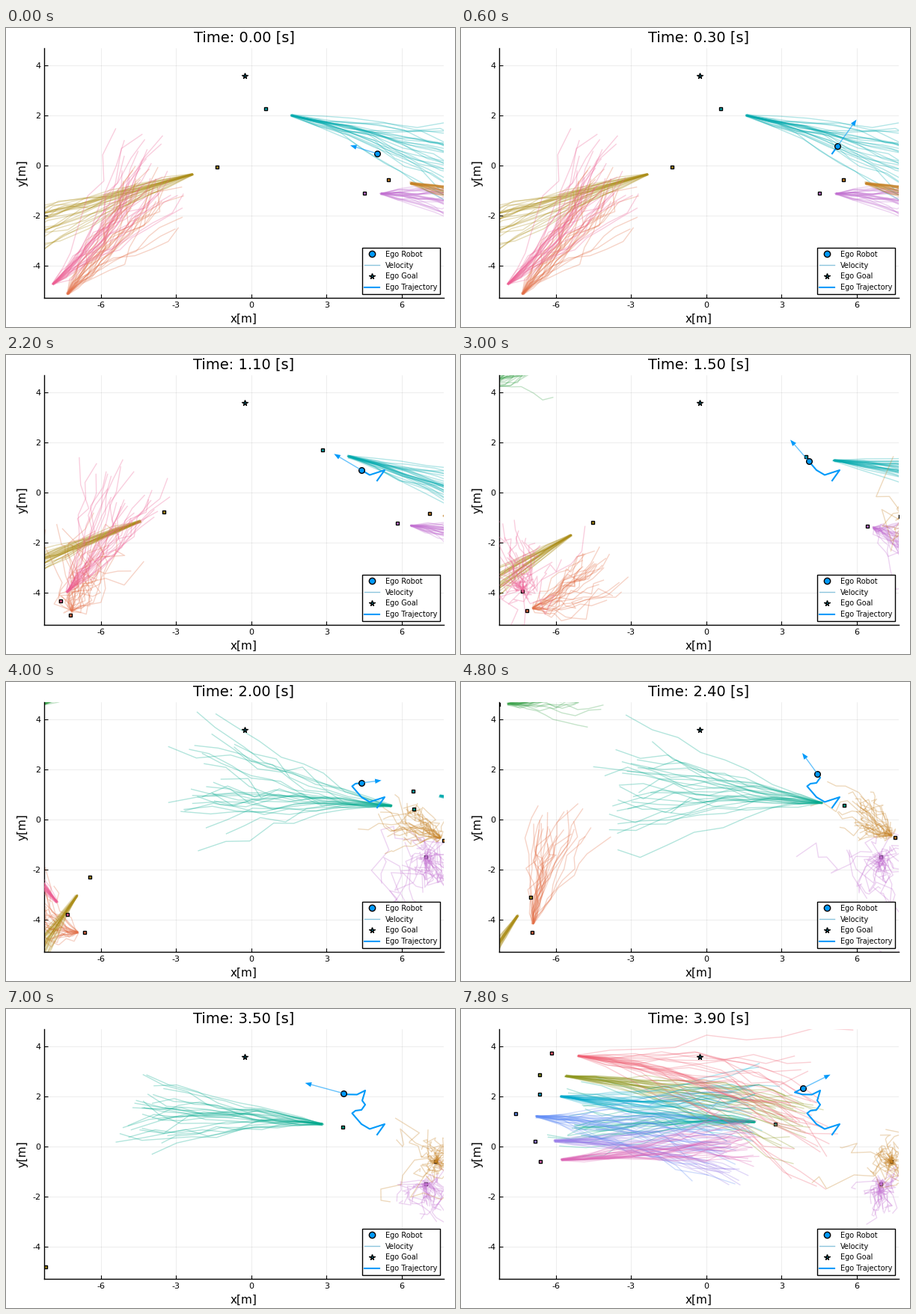
These frames come from a looping animation (600x400 px, 8 s). A matplotlib script:

```python
import numpy as np
import matplotlib.pyplot as plt
from matplotlib.animation import FuncAnimation
from matplotlib.collections import LineCollection
from matplotlib.lines import Line2D
from matplotlib.patches import Polygon

plt.rcParams["font.family"] = "DejaVu Sans"
plt.rcParams["axes.unicode_minus"] = False

W, H, SCALE = 600, 400, 33.5           # stage size, pixels per metre
LEFT, RIGHT, TOP, BOTTOM = 51.2, 584.8, 27, 361
FRAMES, HOLD = 40, 4                   # pedestrians refresh every HOLD frames
HORIZON, SAMPLES = 8, 28
BLUE = "#009AFA"

rng = np.random.default_rng(12)
scenes = [[] for _ in range(FRAMES // HOLD)]


def metres(x, y):
    """Stage pixels to plot coordinates."""
    return (np.asarray(x) - 327.8) / SCALE, (184 - np.asarray(y)) / SCALE


def along(keys, t):
    """Position at time t on a path of (time, x, y) key points."""
    time, x, y = np.transpose(keys)
    return np.column_stack([np.interp(t, time, x), np.interp(t, time, y)])


def fan(pos, step, lean, spread):
    """Sampled futures: slow walkers scatter, fast ones spread from a beam."""
    speed = np.hypot(*step)
    slow = np.exp(-speed / 0.25)
    rough = 0.12 + 0.7 * slow
    unit = step / max(speed, 1e-6)
    s = np.linspace(0, 1, HORIZON + 1)[:, None]
    mean = pos + 0.9 * step + s * HORIZON * step + s ** 2 * np.array(lean)
    futures = []
    for _ in range(SAMPLES):
        drift = rng.normal(size=(HORIZON, 2)).cumsum(0).cumsum(0) / 14.3
        walk = rng.normal(size=(HORIZON, 2)).cumsum(0) / HORIZON ** 0.5
        off = np.vstack([[0, 0], (1 - rough) * drift + rough * walk])
        off += rng.normal(size=off.shape) * 0.14 * s
        off -= 0.5 * (1 - slow) * np.outer(off @ unit, unit)
        off *= np.exp(0.6 * slow * rng.normal())
        futures.append(mean + spread * off + rng.normal(size=2) * 0.022)
    return futures


def walker(color, keys, lean=(0, 0), spread=(0.9, 0.9)):
    """Add a pedestrian from its first key step up to the one before its last."""
    first, last = keys[0][0], keys[-1][0]
    for k in range(first, last):
        pos, ahead = along(keys, [k, k + 1])
        width = np.interp(k, [first, last], spread)
        scenes[k].append((color, pos, fan(pos, ahead - pos, lean, width)))


walker("#E36F47", [(0, -7.6, -5.5), (1, -7.3, -5.1), (3, -7.15, -4.72), (5, -6.65, -4.52),
                   (6, -6.95, -4.5), (7, -6.9, -4.13), (8, -6.75, -3.6)], (.5, .9), (1.3, .9))
walker("#3EA44E", [(3, -9.6, 4.2), (5, -8.9, 4.35), (6, -8.3, 4.6), (7, -7.87, 4.62),
                   (8, -7.1, 4.75)], (0, .7), (.7, .7))
walker("#C371D2", [(0, 4.52, -1.1), (1, 5.24, -1.13), (3, 6.42, -1.33), (5, 6.95, -1.5),
                   (10, 6.98, -1.5)], (0, -.7), (1.3, .4))
walker("#AC8E18", [(0, -1.37, -.06), (1, -2.45, -.38), (3, -4.53, -1.18), (5, -6.43, -2.3),
                   (7, -7.57, -3.92), (9, -8.85, -5.72)], (0, -.4), (1.1, .8))
walker("#00AAAE", [(0, .57, 2.26), (3, 3.97, 1.42), (5, 6.45, 1.12), (6, 7.65, .93)],
       (0, -.6), (1.3, .7))
walker("#ED5E93", [(0, -8.4, -5.1), (1, -7.87, -4.7), (3, -7.33, -3.95), (5, -7.33, -3.78),
                   (6, -7.8, -3.25)], (0, 1), (1.2, .8))
walker("#C68225", [(0, 5.47, -.57), (1, 6.45, -.72), (3, 7.75, -.95), (4, 7.85, -.95),
                   (7, 7.36, -.62), (10, 7.37, -.57)], spread=(1.4, .55))
walker("#00A98D", [(4, 7.45, .3), (7, 4.53, .68), (9, 2.75, .9), (10, 1.85, .99)],
       (0, -.4), (1.6, .8))

# a group entering from the left: colour, position, step, sideways lean, spread
for color, x, y, dx, dy, lean, spread in [
    ("#8E971E", -6.65, 2.87, 1.15, -.07, -.9, 1.1),
    ("#00A9CC", -6.65, 2.1, .94, -.1, .2, 1.0),
    ("#9B7FE9", -6.83, .22, .86, 0, -.9, .8),
    ("#618DF6", -7.6, 1.3, .9, -.1, 0, 1.4),
    ("#F06073", -6.17, 3.73, 1.17, -.12, -1.7, 1.6),
    ("#DD65B6", -6.62, -.6, .94, .08, -.1, .8),
]:
    walker(color, [(9, x, y), (10, x + dx, y + dy)], (0, lean), (spread, spread))

turns = [(0, 496, 168), (4, 506, 154), (8, 486, 160.5), (11, 475, 154), (16, 462.5, 139.5),
         (17, 467, 136), (20, 475, 135), (22, 480, 128), (24, 476, 122.5), (27, 478.7, 113.7),
         (28, 480, 109), (31, 469, 114.5), (34, 456.3, 114.3), (36, 446, 111.5), (39, 457, 106)]
robot = np.column_stack(metres(*along(turns, np.arange(FRAMES)).T))
velocity = np.vstack([[-36 / SCALE, 11 / SCALE], np.diff(robot, axis=0) * 10])

fig = plt.figure(figsize=(W / 100, H / 100), dpi=100, facecolor="white")
ax = fig.add_axes([LEFT / W, 1 - BOTTOM / H, (RIGHT - LEFT) / W, (BOTTOM - TOP) / H])
xlim, ylim = metres([LEFT, RIGHT], [BOTTOM, TOP])
ax.set(xlim=xlim, ylim=ylim, xticks=range(-6, 7, 3), yticks=range(-4, 5, 2))
ax.tick_params(direction="in", labelsize=8)
ax.grid(color="black", alpha=0.1, linewidth=0.5)
ax.set_axisbelow(True)
ax.spines[["top", "right"]].set_visible(False)
ax.spines[["left", "bottom"]].set_linewidth(1)
ax.set_xlabel("x[m]", size=11)
ax.set_ylabel("y[m]", size=11)
title = ax.set_title("", size=14)

edge = dict(markeredgecolor="black", markeredgewidth=1, linestyle="none")
goal = dict(marker="*", ms=5.3, markerfacecolor="#00A0C0", **edge)
layers = []
for n in range(max(map(len, scenes))):
    mark, = ax.plot([], [], "s", ms=3.1, zorder=2 + n / 10, **edge)
    lines = LineCollection([], linewidths=1, alpha=0.3, zorder=2.05 + n / 10)
    ax.add_collection(lines, autolim=False)
    layers.append((mark, lines))
ax.plot(*metres([319], [64]), zorder=4, **goal)
trail, = ax.plot([], [], color=BLUE, linewidth=1.5, zorder=5)
body, = ax.plot([], [], "o", ms=5.5, color=BLUE, zorder=6, **edge)
shaft, = ax.plot([], [], color=BLUE, alpha=0.6, linewidth=1, zorder=7)
head = Polygon(np.zeros((3, 2)), closed=True, color=BLUE, linewidth=0, zorder=7)
ax.add_patch(head)

legend = ax.legend(
    [Line2D([], [], marker="o", ms=6, color=BLUE, **edge),
     Line2D([], [], color="#8CC4DC", linewidth=1),
     Line2D([], [], **goal),
     Line2D([], [], color=BLUE, linewidth=1.5)],
    ["Ego Robot", "Velocity", "Ego Goal", "Ego Trajectory"],
    loc="lower right", fontsize=7, fancybox=False, framealpha=1,
    edgecolor="black", numpoints=1)
legend.get_frame().set_linewidth(1)
legend.set_zorder(10)


def draw(i):
    scene = scenes[i // HOLD]
    title.set_text(f"Time: {i / 10:.2f} [s]")
    for n, (mark, lines) in enumerate(layers):
        shown = n < len(scene)
        mark.set_visible(shown)
        lines.set_visible(shown)
        if shown:
            color, (x, y), futures = scene[n]
            mark.set_data([x], [y])
            mark.set_markerfacecolor(color)
            lines.set_segments(futures)
            lines.set_color(color)

    pos, vel = robot[i], velocity[i]
    tip = pos + vel
    unit = vel / np.hypot(*vel)
    side = np.array([-unit[1], unit[0]]) * 3.2 / SCALE
    base = tip - unit * 8.5 / SCALE
    trail.set_data(*robot[:i + 1].T)
    body.set_data([pos[0]], [pos[1]])
    shaft.set_data([pos[0], base[0]], [pos[1], base[1]])
    head.set_xy([tip, base + side, base - side])
    return [title, trail, body, shaft, head, *(a for pair in layers for a in pair)]


anim = FuncAnimation(fig, draw, frames=FRAMES, init_func=lambda: draw(0),
                     interval=200, repeat=True, repeat_delay=0, blit=False)
plt.show()
```
